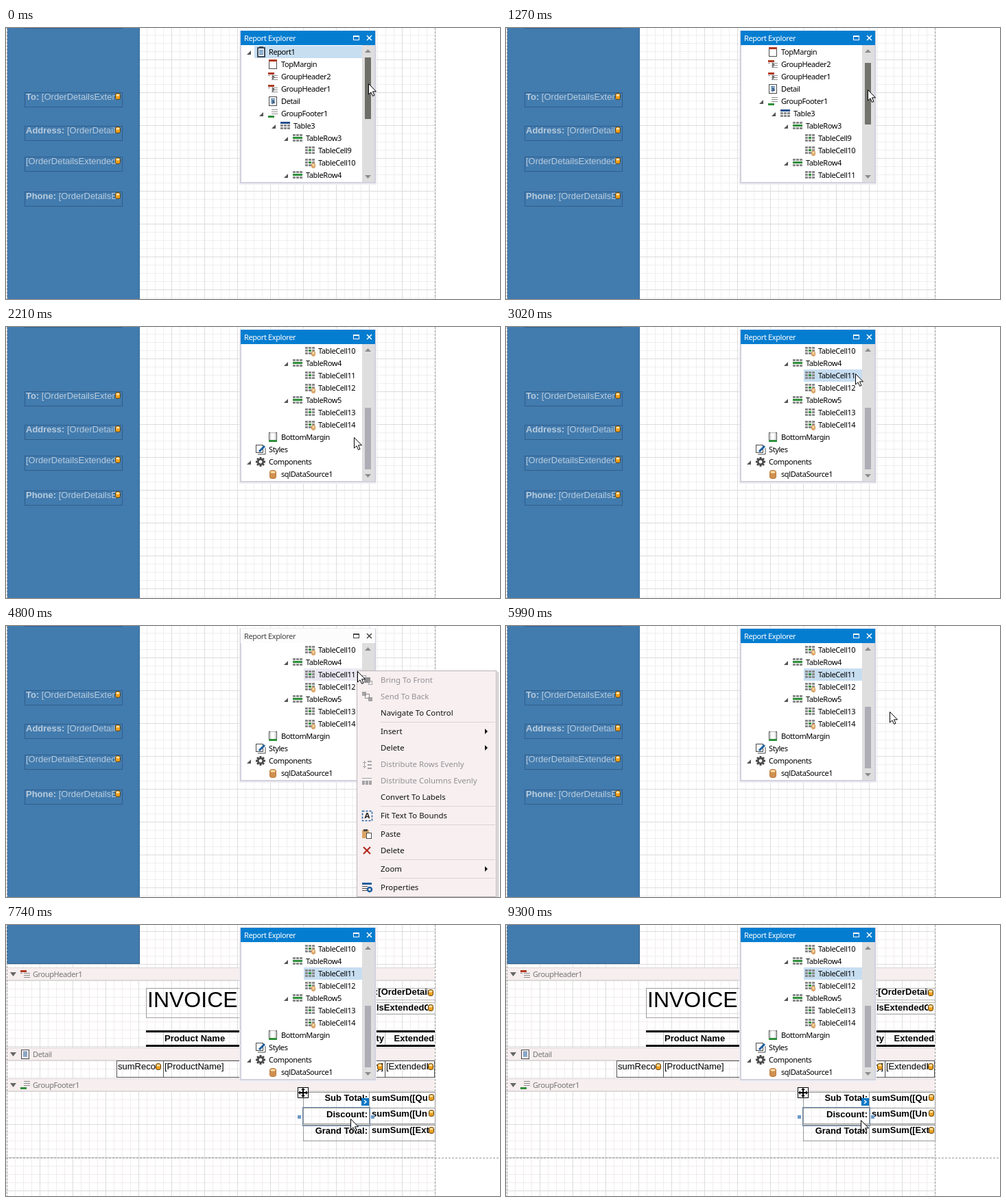
An HTML page with a canvas for the animation above (9500 ms loop, 720x396 px).

```html
<!DOCTYPE html>
<html lang="en">
<head>
<meta charset="utf-8">
<title>Report designer</title>
<style>
html, body { margin: 0; width: 100%; height: 100%; overflow: hidden; background: #fff; }
canvas { display: block; }
</style>
</head>
<body>
<canvas id="stage" width="720" height="396"></canvas>
<script>
const ctx = document.getElementById('stage').getContext('2d');
const LOOP = 9500;
const UI = '11px "Noto Sans", sans-serif';
const MENU = '11.4px "Noto Sans", sans-serif';
const BODY = '13px "Liberation Sans", Arial, sans-serif';
const BOLD = 'bold ' + BODY;
const GRAY = '#8a8a8a', DARK = '#4a4a4a', RED = '#b03a22', GREEN = '#2f8f3a', BLUE = '#1f5f9f', ORANGE = '#d39a5c';

// ---------- drawing helpers ----------
function rect(x, y, w, h, color) {
  ctx.fillStyle = color;
  ctx.fillRect(x, y, w, h);
}
function box(x, y, w, h, color, width = 1) {
  ctx.strokeStyle = color;
  ctx.lineWidth = width;
  ctx.strokeRect(x + .5, y + .5, w - 1, h - 1);
}
function poly(points, fill, stroke, width = 1) {
  ctx.beginPath();
  points.forEach(([x, y]) => ctx.lineTo(x, y));
  if (fill) { ctx.closePath(); ctx.fillStyle = fill; ctx.fill(); }
  if (stroke) { ctx.strokeStyle = stroke; ctx.lineWidth = width; ctx.stroke(); }
}
function text(str, x, y, color, font = UI, align = 'left') {
  ctx.font = font;
  ctx.letterSpacing = font === UI ? '-0.4px' : '0px';
  ctx.textAlign = align;
  ctx.fillStyle = color;
  ctx.fillText(str, x, y);
}
function clipped(x, y, w, h, draw) {
  ctx.save();
  ctx.beginPath();
  ctx.rect(x, y, w, h);
  ctx.clip();
  draw();
  ctx.restore();
}
function dashed(x0, y0, x1, y1) {
  ctx.setLineDash([3, 2]);
  poly([[x0, y0], [x1, y1]], null, '#9a9a9a');
  ctx.setLineDash([]);
}
function cylinder(x, y, w, h, fill, edge) {
  const r = w / 2;
  ctx.beginPath();
  ctx.ellipse(x + r, y + 2, r, 2, 0, Math.PI, 0);
  ctx.ellipse(x + r, y + h - 2, r, 2, 0, 0, Math.PI);
  ctx.closePath();
  ctx.fillStyle = fill;
  ctx.fill();
  ctx.lineWidth = 1;
  ctx.strokeStyle = edge;
  ctx.stroke();
  ctx.beginPath();
  ctx.ellipse(x + r, y + 2.5, r - 1, 1.5, 0, 0, 7);
  ctx.fillStyle = '#fbe3ae';
  ctx.fill();
}
const dataTag = (x, y) => cylinder(x + .5, y + .5, 7, 9, '#f0a020', '#5a4010');

function cells(x, y, rows) {
  for (const row of rows)
    for (let i = 0; i < 3; i++) rect(x + i * 5, y + row * 4, 4, 3, GRAY);
}

// Each icon is drawn in a 15 x 14 area
const icons = {
  report(x, y) {
    rect(x + 2, y, 12, 15, '#3c4a58');
    rect(x + 4, y + 2, 8, 11, '#fff');
    rect(x + 5, y - 1, 6, 3, '#3c4a58');
    for (let i = 4; i < 12; i += 2) rect(x + 5, y + i, 6, 1, BLUE);
  },
  top(x, y) { box(x + 1, y, 12, 14, DARK); rect(x + 1, y, 12, 3, RED); },
  bottom(x, y) {
    box(x + 1, y, 12, 14, DARK);
    box(x + 3, y, 8, 12, '#b5b5b5');
    rect(x + 1, y + 11, 12, 3, GREEN);
  },
  header(x, y) {
    rect(x, y + 1, 9, 3, RED);
    for (let i = 5; i < 13; i += 3) rect(x + 5, y + i, 9, 1, GRAY);
    rect(x, y + 5, 3, 1, GRAY);
  },
  footer(x, y) {
    for (let i = 1; i < 9; i += 3) rect(x + 5, y + i, 9, 1, GRAY);
    rect(x, y + 10, 9, 3, GREEN);
  },
  detail(x, y) {
    box(x + 1, y, 12, 14, DARK);
    for (let i = 3; i < 11; i += 2) rect(x + 4, y + i, 6, 1, BLUE);
  },
  table(x, y) { rect(x, y + 1, 14, 3, '#24508e'); cells(x, y + 1, [1, 2]); },
  row(x, y) { cells(x, y + 1, [0, 2]); rect(x, y + 5, 14, 3, GREEN); },
  cell(x, y) { cells(x, y + 1, [0, 1, 2]); rect(x + 5, y + 5, 4, 3, GREEN); },
  bound(x, y) { icons.cell(x, y); cylinder(x + 9.5, y + 7.5, 5, 7, '#e2ac70', ORANGE); },
  styles(x, y) {
    box(x, y, 11, 12, DARK);
    poly([[x + 3, y + 14], [x + 14, y + 14], [x + 14, y + 5]], null, DARK);
    poly([[x + 5, y + 10], [x + 13, y + 2]], null, BLUE, 3);
  },
  gear(x, y) {
    ctx.save();
    ctx.translate(x + 7, y + 7);
    for (let i = 0; i < 4; i++) { rect(-1.5, -7, 3, 14, DARK); ctx.rotate(Math.PI / 4); }
    ctx.beginPath();
    ctx.arc(0, 0, 3.7, 0, 7);
    ctx.fillStyle = '#fff';
    ctx.fill();
    ctx.lineWidth = 2.6;
    ctx.strokeStyle = DARK;
    ctx.stroke();
    ctx.restore();
  },
  source(x, y) { cylinder(x + 2.5, y + 1.5, 9, 12, '#cf9050', '#b87a3c'); }
};

// ---------- motion ----------
const smooth = p => p * p * (3 - 2 * p);
const accelerate = p => p ** 1.3;

// start, end, x, y, optional x of the curve's control point, easing
const moves = [
  [1090, 2020, 513, 169],
  [2050, 2960, 509, 68, 471],
  [3290, 3350, 512, 69],
  [3520, 3750, 512, 68],
  [3880, 4040, 512, 66],
  [4800, 5630, 559, 125],
  [6320, 7220, 502, 282, 594, accelerate],
  [7420, 7550, 503, 283],
  [7680, 8340, 516, 284, 488],
  [9299, 9300, 517, 285]
];
const progress = (t, a, b) => Math.min(1, Math.max(0, (t - a) / (b - a)));

function pointer(t) {
  let x = 528, y = 81;
  for (const [start, end, toX, toY, bend = (x + toX) / 2, ease = smooth] of moves) {
    if (t < start) break;
    const p = ease(progress(t, start, end)), q = 1 - p;
    x = q * q * x + 2 * q * p * bend + p * p * toX;
    y += (toY - y) * p;
  }
  return [Math.round(x), Math.round(y)];
}

// ---------- design surface ----------
function grid(top, bottom, origin, minor = '#efefef') {
  clipped(0, top, 626, bottom - top, () => {
    for (const major of [false, true]) {
      const step = major ? 48 : 12, color = major ? '#dcdcdc' : minor;
      for (let x = 1; x < 626; x += step) rect(x, top, 1, bottom - top, color);
      for (let y = origin; y < bottom; y += step) rect(0, y, 626, 1, color);
    }
  });
}
function margins() {
  dashed(1.5, 0, 1.5, 396);
  dashed(625.5, 0, 625.5, 396);
}
function addressPage() {
  grid(0, 396, -2);
  rect(2, 0, 193, 396, '#427bae');
  rect(194, 0, 1, 396, '#356a9b');
  rect(27, 0, 143, 1, '#2f5f8c');
  const fields = [['To: ', '[OrderDetailsExtended', 94], ['Address: ', '[OrderDetailsExtended', 143],
    ['', '[OrderDetailsExtended', 188], ['Phone: ', '[OrderDetailsExtended', 239]];
  for (const [label, field, y] of fields) {
    clipped(27, y, 133, 22, () => {
      text(label, 29, y + 11, '#b9cbdc', BOLD);
      text(field, 29 + ctx.measureText(label).width, y + 11, '#b9cbdc', BODY);
    });
    box(27, y, 143, 22, '#2f5f8c');
    dataTag(159, y + 1);
  }
  margins();
}
function band(y, name, icon) {
  rect(0, y, 625, 19, '#f6eeef');
  rect(0, y, 625, 1, '#ddd5d7');
  rect(0, y + 18, 625, 1, '#ddd5d7');
  poly([[6, y + 7], [15, y + 7], [10.5, y + 13]], '#666');
  icons[icon](21, y + 3);
  text(name, 39, y + 14, '#777');
}
function moveHandle(x, y) {
  rect(x, y, 16, 16, '#fff');
  box(x, y, 16, 16, '#000');
  rect(x + 7, y + 3, 2, 10, '#000');
  rect(x + 3, y + 7, 10, 2, '#000');
  ctx.save();
  ctx.translate(x + 8, y + 8);
  for (let i = 0; i < 4; i++) {
    poly([[0, -7], [3, -4], [-3, -4]], '#000');
    ctx.rotate(Math.PI / 2);
  }
  ctx.restore();
}
function invoicePage(mouseY) {
  const pink = '#f2ecee';
  grid(0, 62, 9, pink);
  grid(81, 179, 81, pink);
  grid(198, 224, 198, pink);
  grid(243, 340, 243, pink);
  grid(340, 396, 340, pink);
  rect(2, 0, 193, 57, '#427bae');
  box(1, -2, 194, 59, '#2f5f8c');
  band(62, 'GroupHeader1', 'header');
  band(179, 'Detail', 'detail');
  band(224, 'GroupFooter1', 'footer');
  margins();
  dashed(0, 340.5, 720, 340.5);

  // Title and order fields
  box(204, 92, 160, 44, '#a5a5a5');
  text('INVOICE', 206, 120, '#000', '32px "Liberation Sans", Arial, sans-serif');
  box(500, 92, 126, 18, '#b5b5b5');
  box(500, 113, 126, 18, '#b5b5b5');
  text(':[OrderDetail', 538, 102, '#000', BOLD);
  text('lsExtendedO', 540, 125, '#000', BOLD);
  rect(615, 93, 9, 14, '#fff');
  rect(615, 115, 9, 14, '#fff');
  dataTag(615, 94);
  dataTag(615, 116);

  // Column titles
  rect(204, 154, 421, 3, '#000');
  rect(204, 175, 421, 3, '#000');
  for (const x of [229, 552]) rect(x, 157, 1, 18, '#c0c0c0');
  text('Product Name', 231, 170, '#000', BOLD);
  text('Quantity', 551, 170, '#000', BOLD, 'right');
  text('Extended', 624, 170, '#000', BOLD, 'right');

  // Detail row
  box(161, 198, 464, 25, '#555');
  for (const x of [229, 552]) rect(x, 198, 1, 25, '#555');
  clipped(162, 199, 56, 23, () => text('sumRecord', 163, 211, '#000', BODY));
  text('[ProductName]', 231, 211, '#000', BODY);
  text('y]', 550, 211, '#000', BODY, 'right');
  clipped(553, 199, 62, 23, () => text('[ExtendedP', 554, 211, '#000', BODY));
  for (const x of [218, 541, 615]) dataTag(x, 202);

  // Totals
  const totals = [['Sub Total:', 'sumSum([Qu', 244], ['Discount:', 'sumSum([Un', 267], ['Grand Total:', 'sumSum([Ext', 292]];
  for (const [label, value, y] of totals) {
    box(433, y, 193, 24, '#999');
    rect(529, y, 1, 24, '#999');
    const base = y + (y === 267 ? 14 : 13);
    text(label, 527, base, '#000', BOLD, 'right');
    clipped(530, y, 88, 24, () => text(value, 533, base - (y > 260 ? 1 : 0), '#000', BOLD));
    dataTag(616, y + 3);
  }
  box(432, 266, 99, 28, '#6a87ab');
  rect(425, 278, 5, 5, '#6c9cc8');
  rect(532, 278, 5, 5, '#6c9cc8');
  rect(518, 253, 11, 11, '#0b78c8');
  poly([[522, 256], [525, 258.5], [522, 261]], null, '#fff', 1.5);

  if (mouseY > 162 && mouseY < 179) moveHandle(196, 147);
  if (mouseY >= 198 && mouseY < 223) moveHandle(153, 192);
  if (mouseY >= 244) moveHandle(425, 237);
}

// ---------- report explorer ----------
// name, level, icon, expander
const tree = [
  ['Report1', 0, 'report', 'open'], ['TopMargin', 1, 'top'],
  ['GroupHeader2', 1, 'header', 'closed'], ['GroupHeader1', 1, 'header', 'closed'],
  ['Detail', 1, 'detail', 'closed'], ['GroupFooter1', 1, 'footer', 'open'],
  ['Table3', 2, 'table', 'open'],
  ['TableRow3', 3, 'row', 'open'], ['TableCell9', 4, 'cell'], ['TableCell10', 4, 'bound'],
  ['TableRow4', 3, 'row', 'open'], ['TableCell11', 4, 'cell'], ['TableCell12', 4, 'bound'],
  ['TableRow5', 3, 'row', 'open'], ['TableCell13', 4, 'cell'], ['TableCell14', 4, 'bound'],
  ['BottomMargin', 1, 'bottom'], ['Styles', 0, 'styles'],
  ['Components', 0, 'gear', 'open'], ['sqlDataSource1', 1, 'source']
];
function explorer(t) {
  const active = t < 4800 || t >= 5990;
  const ink = active ? '#fff' : '#444';
  const firstRow = Math.round(9 * smooth(progress(t, 1090, 2020)));
  const selected = t < 3020 ? 0 : 11;
  const highlight = t >= 4800 && t < 5830 ? '#e9e8f2' : '#c7def1';

  rect(340, 3, 200, 226, '#eeeef3');
  rect(341, 4, 198, 223, '#d3d1de');
  rect(343, 25, 194, 200, '#fff');
  rect(342, 4, 196, 21, active ? '#047dd0' : '#fdfcfd');
  text('Report Explorer', 347, 19, ink);
  box(506, 11, 9, 7, ink);
  rect(506, 11, 9, 2, ink);
  poly([[526, 11], [533, 18]], null, ink, 1.5);
  poly([[533, 11], [526, 18]], null, ink, 1.5);

  tree.slice(firstRow, firstRow + 11).forEach(([name, level, icon, state], i) => {
    const x = 383 + level * 18, y = 26 + i * 18;
    if (firstRow + i === selected) rect(x - 21, y, 157 - level * 18, 18, highlight);
    if (state === 'open') poly([[x - 26, y + 7], [x - 26, y + 13], [x - 32, y + 13]], '#555');
    if (state === 'closed') poly([[x - 13, y + 6], [x - 9, y + 10], [x - 13, y + 14]].map(p => [p[0] , p[1]]), '#666');
    icons[icon](x - 19, y + 2);
    text(name, x, y + 13, '#000');
  });

  rect(519, 25, 18, 200, '#dfdedf');
  poly([[523, 36], [532, 36], [527.5, 31]], '#8c8b8c');
  poly([[523, 215], [532, 215], [527.5, 220]], '#8c8b8c');
  const thumb = t < 130 ? '#6e6e69' : t < 2080 ? '#73736d' : '#aeadb6';
  rect(523, 43 + Math.round(firstRow * 25 / 3), 9, 90, thumb);
}

// ---------- context menu ----------
// label, centre y, kind
const menuItems = [
  ['Bring To Front', 79, 'off'], ['Send To Back', 103, 'off'], ['Navigate To Control', 127],
  ['Insert', 154, 'sub'], ['Delete', 178, 'sub'], ['Distribute Rows Evenly', 202, 'off'],
  ['Distribute Columns Evenly', 226, 'off'], ['Convert To Labels', 250], ['Fit Text To Bounds', 277],
  ['Paste', 304], ['Delete', 328], ['Zoom', 355, 'sub'], ['Properties', 382]
];
function contextMenu(mouseY) {
  rect(513, 67, 205, 329, '#cfcacc');
  rect(511, 65, 205, 331, '#f7eff0');
  box(511, 65, 204, 331, '#b9b3b6');
  if (mouseY >= 115) rect(513, 115, 200, 24, '#c7def1');
  for (const y of [140, 263, 290, 341, 368]) rect(546, y, 167, 1, '#dcd3d6');
  for (const [label, y, kind] of menuItems) {
    text(label, 546, y + 4, kind === 'off' ? '#929094' : '#111', MENU);
    if (kind === 'sub') poly([[698, y - 4], [702, y], [698, y + 4]], '#111');
  }
  // Stacking icons
  rect(522, 75, 9, 8, '#8f8d90');
  for (const y of [72, 96]) { box(519, y, 6, 6, '#a5a3a6'); box(528, y + 8, 6, 6, '#a5a3a6'); }
  rect(519, 96, 6, 6, '#a5a3a6');
  rect(528, 104, 6, 6, '#a5a3a6');
  box(523, 99, 7, 7, '#8f8d90');
  // Distribution icons
  for (const dy of [-5, 0, 5]) rect(527, 202 + dy, 6, 2, '#a5a3a6');
  rect(522, 197, 1, 11, '#a5a3a6');
  rect(520, 199, 5, 1, '#a5a3a6');
  rect(520, 205, 5, 1, '#a5a3a6');
  for (const dx of [0, 5, 10]) rect(519 + dx, 226, 4, 6, '#a5a3a6');
  rect(519, 222, 14, 1, '#a5a3a6');
  // Fit text
  ctx.setLineDash([3, 2]);
  box(519, 270, 15, 15, BLUE, 1.5);
  ctx.setLineDash([]);
  text('A', 526.5, 281, '#222', 'bold ' + MENU, 'center');
  // Clipboard, cross, settings
  rect(519, 298, 10, 12, '#dca468');
  rect(521, 297, 6, 3, DARK);
  rect(525, 302, 8, 9, '#fff');
  box(525, 302, 8, 9, DARK);
  poly([[521, 323], [531, 333]], null, '#b02318', 2);
  poly([[531, 323], [521, 333]], null, '#b02318', 2);
  rect(519, 375, 14, 3, BLUE);
  for (const y of [380, 383, 386]) rect(519, y, 8, 1, DARK);
  ctx.beginPath();
  ctx.arc(530, 385, 3, 0, 7);
  ctx.lineWidth = 2.5;
  ctx.strokeStyle = BLUE;
  ctx.stroke();
}

function drawPointer(x, y, columnMode) {
  ctx.save();
  ctx.translate(x, y);
  if (columnMode) {
    rect(-1, -10, 3, 7, '#000');
    poly([[-2, -4], [3, -4], [.5, 1]], '#000');
  } else {
    poly([[.5, .5], [.5, 16], [4, 12.8], [6.6, 18.4], [9, 17.4], [6.5, 11.8], [11.5, 11.8], [.5, .5]], '#fff', '#000');
  }
  ctx.restore();
}

function frame(now) {
  const t = now % LOOP;
  const [x, y] = pointer(t);
  const navigated = t >= 6090;
  rect(0, 0, 720, 396, '#fff');
  if (navigated) invoicePage(y); else addressPage();
  explorer(t);
  if (t >= 4800 && t < 5830) contextMenu(y);
  drawPointer(x, y, navigated && y > 152 && y <= 162);
  requestAnimationFrame(frame);
}
requestAnimationFrame(frame);
</script>
</body>
</html>
```
